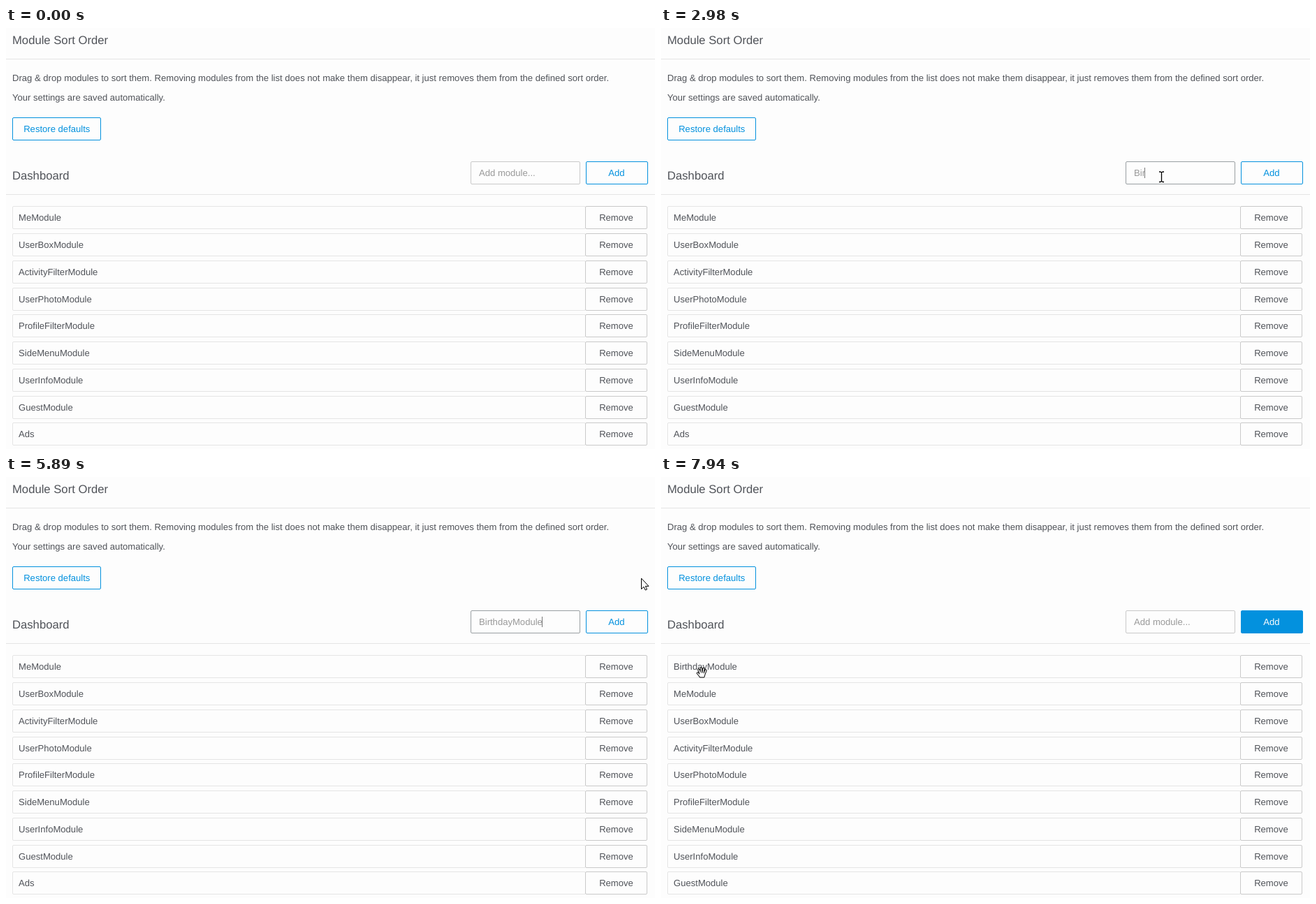
An HTML page that plays this animation: 929 px wide and 603 px high, repeating every 8000 ms.

```html
<!DOCTYPE html>
<html lang="en">
<head>
<meta charset="utf-8">
<title>Module Sort Order</title>
<style>
  html, body { margin: 0; width: 100%; height: 100%; overflow: hidden; background: #fdfdfd; }
  svg { display: block; width: 929px; height: 603px; }
  text { font: 13.08px "Liberation Sans", Arial, sans-serif; fill: #505359; text-rendering: geometricPrecision; }
  .title { font-size: 16.66px; }
  .mid { text-anchor: middle; }
  .box { fill: #fdfdfd; stroke: #e5e5e5; }
  .button { stroke: #c9c9c9; }
  .blue { stroke: #0391de; }
  .link { fill: #0391de; }
  .rule { stroke: #e5e5e5; }
  .hint { fill: #999; }
  #cursor path { fill: #fff; stroke: #000; stroke-linejoin: round; stroke-linecap: round; }
  #cursor .beam { fill: none; stroke-width: 1.3; stroke-linecap: butt; }
  #cursor .outer { fill: none; stroke-width: 3.4; }
  #cursor .inner { stroke: #fff; stroke-width: 1.5; }
</style>
</head>
<body>
<svg id="stage" viewBox="0 0 929 603"></svg>
<script>
const LOOP = 8000, STEP = 35;
const NEW_NAME = 'BirthdayModule';
const NAMES = ['MeModule', 'UserBoxModule', 'ActivityFilterModule', 'UserPhotoModule', 'ProfileFilterModule',
  'SideMenuModule', 'UserInfoModule', 'GuestModule', 'Ads'];
const FOCUS = 1310, TYPE = 2570, KEY_GAP = 187, LAST_KEY = 4805, BLINK = 535, BLUR = 6430, ADDED = 6570;
const PAPER = [253, 253, 253], BLUE = [3, 145, 222], PALE = [221, 241, 253];
const GREY = [201, 201, 201], DARK_GREY = [153, 159, 162];

const clamp = v => Math.max(0, Math.min(1, v));
const smooth = u => u * u * (3 - 2 * u);
const easeOut = u => 1 - (1 - u) ** 3;

// Each move starts where the one before it ended and bends towards "via".
const MOVES = [
  { start: 630, end: 1050, via: [777, 296], to: [729, 212], ease: easeOut },
  { start: 1310, end: 1415, via: [722, 213], to: [716, 213], ease: smooth },
  { start: 5610, end: 5890, via: [800, 165], to: [909, 145], ease: smooth },
  { start: 6010, end: 6430, via: [900, 185], to: [884, 205], ease: smooth },
  { start: 7310, end: 7940, via: [-190, 380], to: [58, 280], ease: smooth }
];
MOVES.forEach((m, i) => { m.from = i ? MOVES[i - 1].to : [919, 394]; });

const FINGERS = 'M-5.5 1L-2.5 4.5M-4-4L-2 1M-.5-6V1M3-5.5L2 1M6-3L4 2M-2 1L4 2L3 5.8H-2Z';
const SHAPES = {
  arrow: '<path d="M.5.5V15.5L4 12.3L6.2 17L8.5 16L6.3 11.4H10.6Z"/>',
  beam: '<path class="beam" d="M-3-7H-1L.5-6L2-7H4M.5-6V6.5M-3 7.5H-1L.5 6.5L2 7.5H4"/>',
  point: '<path d="M-1.5 1Q0-1 1.5 1V7Q3.5 6 4.3 8Q6.3 7 7 9Q9.5 8.5 9.5 11V14Q9 17 7.5 18.5V20.5H-.5V18.5L-4.8 12.5Q-5 9.8-2.8 10.5L-1.5 12Z"/>' +
    '<path d="M1.5 7V11M4.3 8V11.5M7 9V12"/>',
  grab: `<path class="outer" d="${FINGERS}"/><path class="inner" d="${FINGERS}"/>`
};

const stage = document.getElementById('stage');
const rowTop = i => Math.round(255.4 + 38.75 * i);
const text = (x, y, str, cls = '', id = '') => `<text x="${x}" y="${y}" class="${cls}" id="${id}">${str}</text>`;
const box = (x, y, w, cls = '', id = '') =>
  `<rect x="${x + .5}" y="${y + .5}" width="${w}" height="32" rx="1.5" class="box ${cls}" id="${id}"/>`;
const rule = y => `<path class="rule" d="M0 ${y}.5H929"/>`;

stage.innerHTML =
  text(9, 23, 'Module Sort Order', 'title') + rule(44) +
  text(9, 76, 'Drag &amp; drop modules to sort them. Removing modules from the list does not make them disappear, it just removes them from the defined sort order.') +
  text(9, 104, 'Your settings are saved automatically.') +
  box(9, 128, 126, 'blue') + text(72.8, 149, 'Restore defaults', 'link mid') +
  text(9, 217, 'Dashboard', 'title') + rule(238) +
  box(665, 191, 156, 'button', 'field') + text(677, 212, '', 'hint', 'entry') +
  '<path id="caret" d="M0 200V215" stroke="#777"/>' +
  box(830, 191, 88, 'blue', 'add') + text(874, 212, 'Add', 'link mid', 'addText') +
  NAMES.map((name, i) => {
    const y = rowTop(i);
    return box(9, y, 820) + text(18, y + 21, name, '', 'row' + i) +
      box(829, y, 88, 'button', 'remove' + i) + text(873.5, y + 21, 'Remove', 'mid');
  }).join('') +
  '<g id="cursor"></g>';

const el = id => document.getElementById(id);
const mix = (a, b, u) => `rgb(${a.map((v, i) => Math.round(v + (b[i] - v) * u))})`;

function pointerAt(t) {
  const m = MOVES.findLast(move => move.start <= t);
  if (!m) return null;
  const elapsed = Math.floor((t - m.start) / STEP) * STEP;
  const u = m.ease(clamp(elapsed / (m.end - m.start)));
  return m.from.map((a, i) => Math.round(a * (1 - u) ** 2 + m.via[i] * 2 * u * (1 - u) + m.to[i] * u * u));
}

function shapeAt(x, y) {
  if (y >= 191 && y <= 224) {
    if (x >= 830 && x <= 919) return 'point';
    if (x >= 665 && x <= 822) return 'beam';
  }
  const onRow = NAMES.some((_, i) => y >= rowTop(i) && y <= rowTop(i) + 33);
  if (!onRow || x < 9 || x > 918) return 'arrow';
  return x >= 829 ? 'point' : 'grab';
}

function caretShown(t) {
  if (t < FOCUS || t >= BLUR) return false;
  if (t >= TYPE && t < LAST_KEY) return true;
  const since = t < TYPE ? t - FOCUS + 95 : t - LAST_KEY;
  return Math.floor(since / BLINK) % 2 === 0;
}

function draw(t) {
  const added = t >= ADDED;
  const count = Math.max(0, Math.floor((t - TYPE) / KEY_GAP) + 1);
  const typed = added ? '' : NEW_NAME.slice(0, count);
  el('entry').textContent = typed || 'Add module...';
  const caretX = 677 + (typed ? el('entry').getComputedTextLength() : 0);
  el('caret').setAttribute('transform', `translate(${Math.floor(caretX) + .5})`);
  el('caret').style.display = caretShown(t) ? '' : 'none';

  const focus = t < BLUR ? clamp((t - FOCUS + 60) / 180) : 0;
  el('field').style.stroke = mix(GREY, DARK_GREY, focus);

  const fill = clamp((t - 6220) / 160);
  el('add').style.fill = mix(PAPER, BLUE, fill);
  el('addText').style.fill = mix(BLUE, PAPER, fill);

  const hover = t < 660 ? 0 : clamp((1000 - t) / 260);
  el('remove2').style.fill = mix(PAPER, PALE, hover);

  const list = added ? [NEW_NAME, ...NAMES] : NAMES;
  NAMES.forEach((_, i) => { el('row' + i).textContent = list[i]; });

  const p = pointerAt(t);
  el('cursor').innerHTML = p ? SHAPES[shapeAt(...p)] : '';
  if (p) el('cursor').setAttribute('transform', `translate(${p})`);
}

const start = performance.now();
function frame() {
  draw((performance.now() - start) % LOOP);
  requestAnimationFrame(frame);
}
frame();
</script>
</body>
</html>
```
